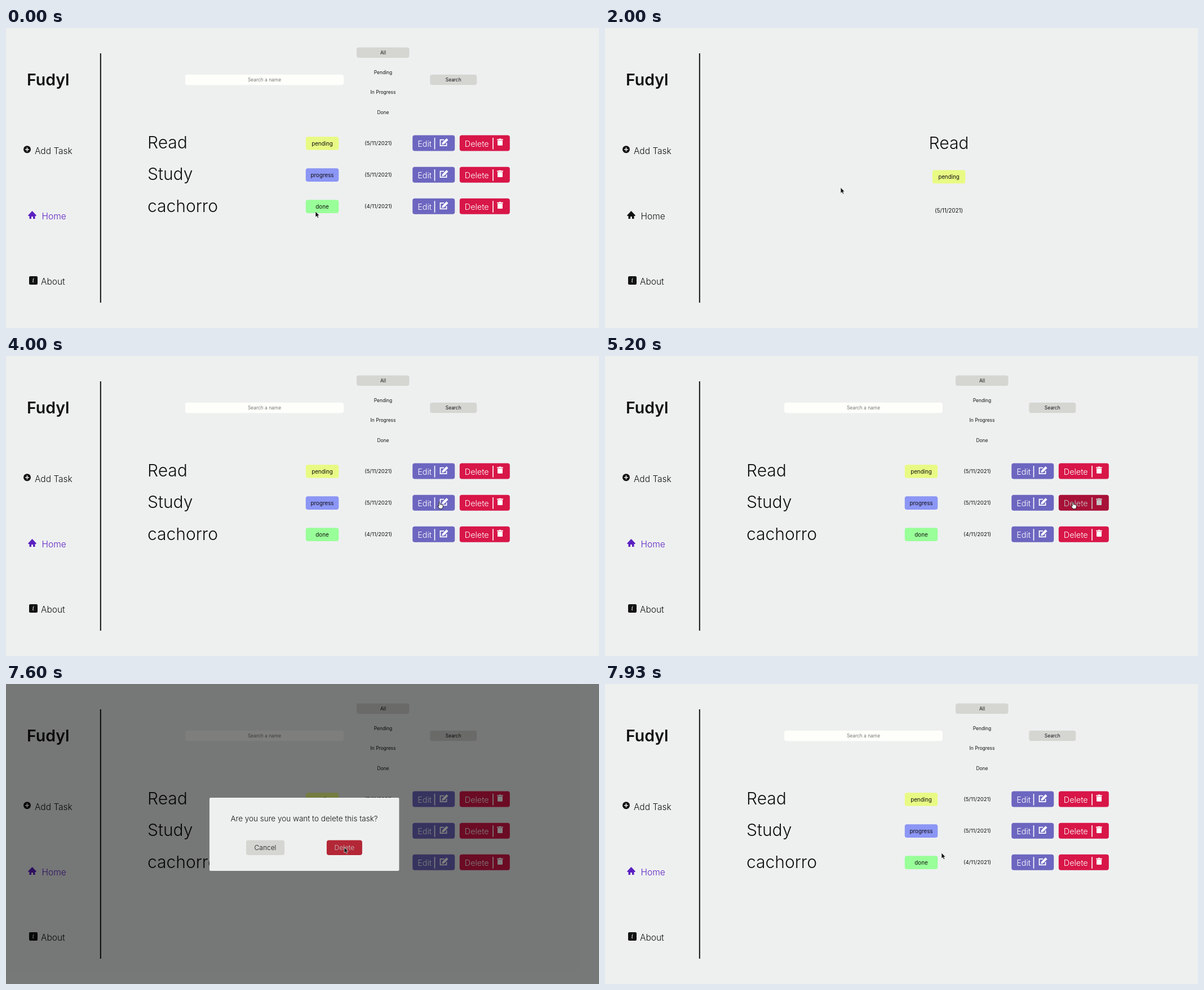
Animation, 1052 px wide and 533 px high, one loop 8 s. Source, as an HTML page:

```html
<!DOCTYPE html>
<html lang="en">
<head>
<meta charset="utf-8">
<title>Task list</title>
<style>
  html, body { margin: 0; width: 100%; height: 100%; overflow: hidden; background: #eef0f0; }
  svg { display: block; font-family: Inter, "Open Sans", sans-serif; font-weight: 300; }
  .mid { text-anchor: middle; }
</style>
</head>
<body>
<svg id="stage" width="1052" height="533" viewBox="0 0 1052 533"></svg>
<script>
const LOOP = 8000, STEP = 1000 / 15;
const INK = '#111', PURPLE = '#5a1fc0', GREY = '#d5d6d2', PAPER = '#eef0f0';
const TINY = 8.4, SMALL = 9.8, BODY = 12, LABEL = 14.4, MENU = 15.5, TITLE = 30;
const stage = document.getElementById('stage');

// Boxes and text are placed by their vertical centre; text() starts at x, mid() is centred on it.
const text = (x, cy, size, str, fill = INK, extra = '') =>
  `<text x="${x}" y="${cy + size * 0.36}" font-size="${size}" fill="${fill}"
    ${size < 11 ? 'font-weight="400"' : ''} ${extra}>${str}</text>`;
const mid = (cx, cy, size, str, fill) => text(cx, cy, size, str, fill, 'class="mid"');
const rect = (cx, cy, w, h, fill, r = 4) =>
  `<rect x="${cx - w / 2}" y="${cy - h / 2}" width="${w}" height="${h}" rx="${r}" fill="${fill}"/>`;
const box = (cx, cy, w, h, fill, size, str, ink) => rect(cx, cy, w, h, fill) + mid(cx, cy, size, str, ink);
const group = (id, body, y = 0) => `<g id="${id}" transform="translate(0 ${y})">${body}</g>`;

const menu = [
  ['add', 51, 'Add Task', `<circle cx="37.5" cy="-2" r="6.5"/>
    <path d="M34-2h7M37.5-5.500v7" stroke="${PAPER}" stroke-width="1.600"/>`],
  ['home', 63.5, 'Home', '<path d="M46.500-9L54-1L53 0H51.500V5H48V1H45V5H41.500V0H40L39-1Z"/>'],
  ['about', 62, 'About', rect(48.5, -2, 15, 15, 'currentColor', 2) +
    text(46.5, -2, 11, 'i', PAPER, 'font-family="Noto Serif, serif" font-style="italic"')],
].map(([id, x, label, icon], i) =>
  group(id, icon + text(x, 0.3, MENU, label, 'currentColor'), 217.7 + i * 116.4)).join('');

const sidebar = text(37, 91.5, 28.5, 'Fudyl', INK, 'font-weight="600"') + rect(167.8, 266.5, 2, 443, INK, 0) + menu;

const filters = box(458.5, 92, 281, 18.5, '#fefffa', TINY, 'Search a name', '#777') +
  rect(668.75, 43.7, 93.5, 18.5, GREY) +
  ['All', 'Pending', 'In Progress', 'Done'].map((s, i) => mid(669, 43.5 + i * 35.4, TINY, s)).join('') +
  box(793.7, 92, 83, 18.5, GREY, TINY, 'Search');

const button = (cx, w, fill, label, divider, icon) => rect(cx, 0, w, 28, fill) +
  text(cx - w / 2 + 9, 1.3, LABEL, label, '#fff') + rect(divider, 0.7, 1.6, 20.5, '#fff', 0) + icon;
const editButton = button(758.7, 75, '#6c66c0', 'Edit', 760.5, `
  <path d="M777-6H770.500V4.500H781.500V-.5" fill="none" stroke="#fff" stroke-width="1.800"/>
  <path d="M774-1L781.500-8.500L784.500-5.500L777 2L773.300 2.700Z" fill="#fff"/>`);
const deleteButton = button(849.3, 89, '#d81648', 'Delete', 864,
  rect(876.5, -6.2, 11, 1.8, '#fff', 0.5) + rect(876.5, -7.3, 4, 1.5, '#fff', 0.5) + rect(876.5, -0.3, 9, 9, '#fff', 1));

const badge = (label, fill) => box(561, 0.4, 58.5, 23.7, fill, SMALL, label);
const rows = [['Read', 'pending', '#e9fa84', 5], ['Study', 'progress', '#8c96f5', 5], ['cachorro', 'done', '#99ff99', 4]]
  .map(([name, state, fill, day], i) => group('row' + i,
    text(251, -1.1, TITLE, name, 'currentColor') + badge(state, fill) +
    mid(660.5, 0.2, 9.5, `(${day}/11/2021)`) + group('edit' + i, editButton) + group('delete' + i, deleteButton),
    204.6 + i * 56.1)).join('');

const details = mid(610, 204, TITLE, 'Read') +
  `<g transform="translate(49 264)">${badge('pending', '#e9fa84')}</g>` + mid(610, 324, SMALL, '(5/11/2021)');

const dialog = rect(526, 266.5, 1052, 533, '#00000080', 0) + rect(529.2, 267, 336.5, 130, PAPER, 2) +
  mid(529, 239.6, 13.5, 'Are you sure you want to delete this task?') +
  box(460, 290.7, 68, 26.5, GREY, BODY, 'Cancel') +
  group('confirm', box(600.4, 290.7, 63, 26.5, '#e63245', BODY, 'Delete', '#fff'));

const cursor = `
  <path id="arrow" d="M0 0V10L2.300 8L4 11.500L5.600 10.800L4.100 7.300H7Z" fill="#111" stroke="#fff" stroke-width=".6"/>
  <path id="hand" d="M0-.7Q1.200-1.900 2-.5V2.800Q3.500 2.100 4 3.200Q5.500 2.700 5.800 3.700Q7.300 3.500 7.300 5V7L6.300 10.500H1.100L-2 6Q-2.100 4.700 0 5.800Z"
    fill="#fff" stroke="#111" stroke-width=".9"/>`;

stage.innerHTML = sidebar + group('list', filters + rows) + group('details', details) +
  '<rect id="status" x="-4" y="530.5" height="8" rx="2" fill="#fff" stroke="#cfd1d1"/>' +
  group('dialog', dialog) + group('cursor', cursor);

const $ = id => document.getElementById(id);
const show = (id, on) => $(id).style.display = on ? '' : 'none';
const during = (t, a, b) => t >= a && t < b;
const clamp = k => Math.min(1, Math.max(0, k));
const ease = k => k * k * (3 - 2 * k);

// Pointer moves: start, end, x, y, upward bow
const moves = [
  [0, 330, 655, 333, 0], [330, 800, 299, 206, 50], [1800, 2270, 605, 405, 0], [3200, 4070, 771, 260, 25],
  [4070, 4470, 829, 261, 0], [6400, 7130, 600, 290, 60], [7800, 7930, 597, 300, 0],
];
function pointerAt(t) {
  let x = 549, y = 326;
  for (const [start, end, toX, toY, bow] of moves) {
    const k = ease(clamp((t - start) / (end - start)));
    x += (toX - x) * k;
    y += (toY - y) * k - 4 * bow * k * (1 - k);
  }
  return [x, y];
}

function hover(id, t, on, off) {
  const k = clamp((t - on) / 200) - clamp((t - off) / 200);
  $(id).style.filter = k ? `brightness(${1 - 0.22 * k})` : '';
}

function draw(now) {
  // The screen advances at 15 steps per second.
  const t = Math.floor((now % LOOP + 4) / STEP) * STEP;
  const onDetails = during(t, 1395, 2465);
  show('list', !onDetails);
  show('details', onDetails);
  for (const id of ['add', 'home', 'about', 'row0', 'row1', 'row2']) {
    const active = id === 'home' ? !onDetails : id === 'row0' && during(t, 790, 1395);
    $(id).style.color = $(id).style.fill = active ? PURPLE : INK;
  }

  hover('edit1', t, 4000, 4200);
  hover('delete1', t, 4200, 6060);
  hover('confirm', t, 6960, 7730);
  show('dialog', during(t, 6060, 7730));

  const statusWidth = during(t, 990, 1800) ? 191 : during(t, 2130, 3260) ? 81 : 0;
  show('status', statusWidth);
  $('status').setAttribute('width', statusWidth + 4);

  const hand = during(t, 790, 1395) || during(t, 2060, 2465) || during(t, 3990, 6060);
  show('hand', hand);
  show('arrow', !hand);
  $('cursor').setAttribute('transform', `translate(${pointerAt(t)})`);
}
function tick() {
  draw(performance.now());
  requestAnimationFrame(tick);
}
tick();
</script>
</body>
</html>
```
